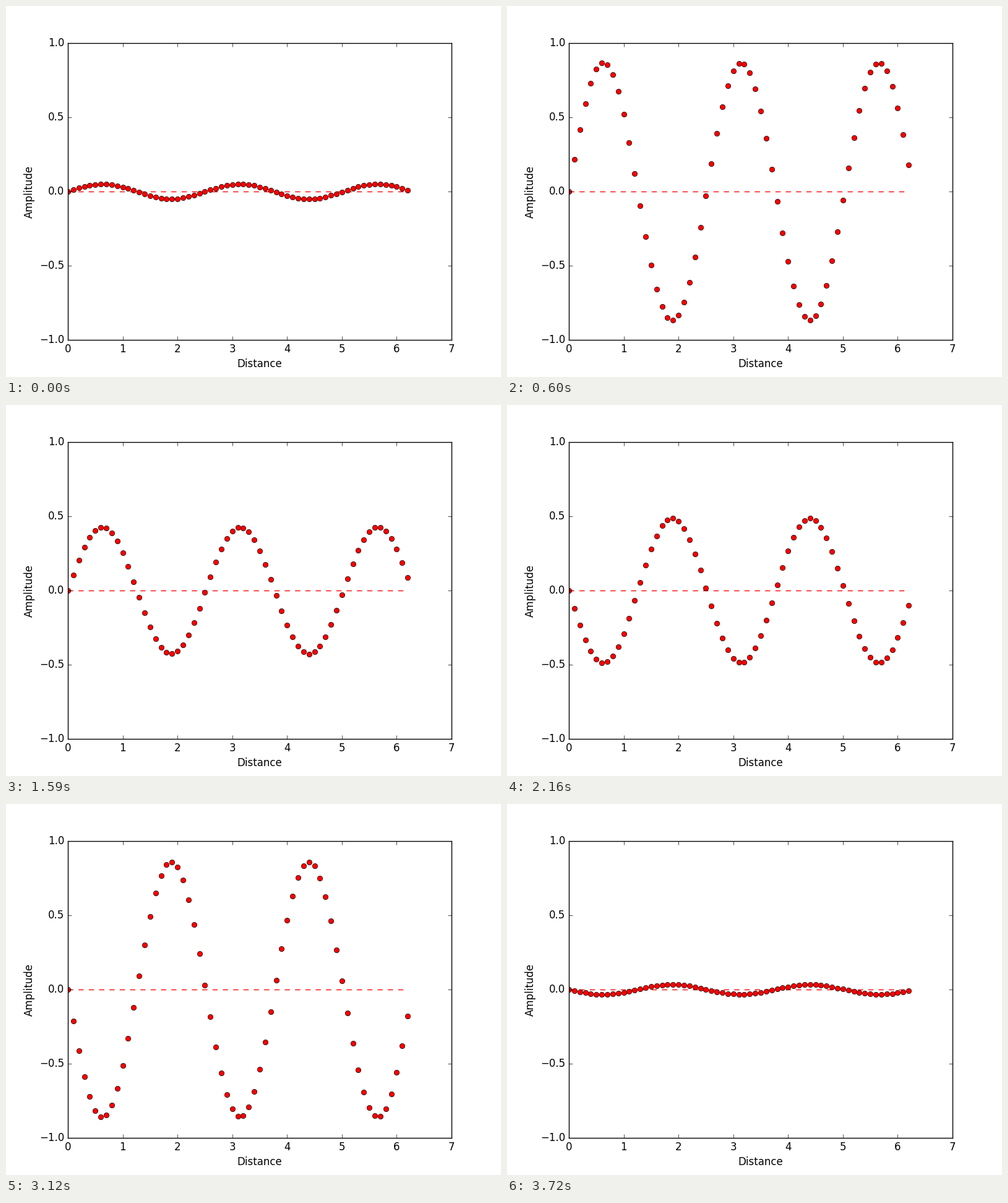
These frames come from a looping animation (800 px wide and 600 px high, 3750 ms). A matplotlib script:

```python
import numpy as np
import matplotlib.pyplot as plt
from matplotlib.animation import FuncAnimation

FRAMES = 125
INTERVAL = 30       # ms
PHASE_STEP = 0.05   # radians per frame
WAVE_NUMBER = 2.5

plt.style.use("classic")
plt.rcParams.update({
    "font.family": "DejaVu Sans",
    "figure.facecolor": "white",
    "ytick.alignment": "center",
})

fig, ax = plt.subplots(figsize=(8, 6), dpi=100)
ax.set_xlim(0, 7)
ax.set_ylim(-1, 1)
ax.set_xticks(np.arange(8))
ax.set_yticks(np.linspace(-1, 1, 5))
ax.set_xlabel("Distance")
ax.set_ylabel("Amplitude")

x = np.arange(0, 2 * np.pi, 0.1)
shape = np.sin(WAVE_NUMBER * x)

ax.plot(x, np.zeros_like(x), "r--", lw=1)
dots, = ax.plot(x, shape, "ro", ms=6, mec="black", mew=0.5)


def update(frame):
    """Scale the standing wave by its swing at this frame."""
    dots.set_ydata(np.sin(PHASE_STEP * (frame + 1)) * shape)
    return dots,


anim = FuncAnimation(fig, update, frames=FRAMES, interval=INTERVAL,
                     repeat=True, repeat_delay=0)
plt.show()
```
